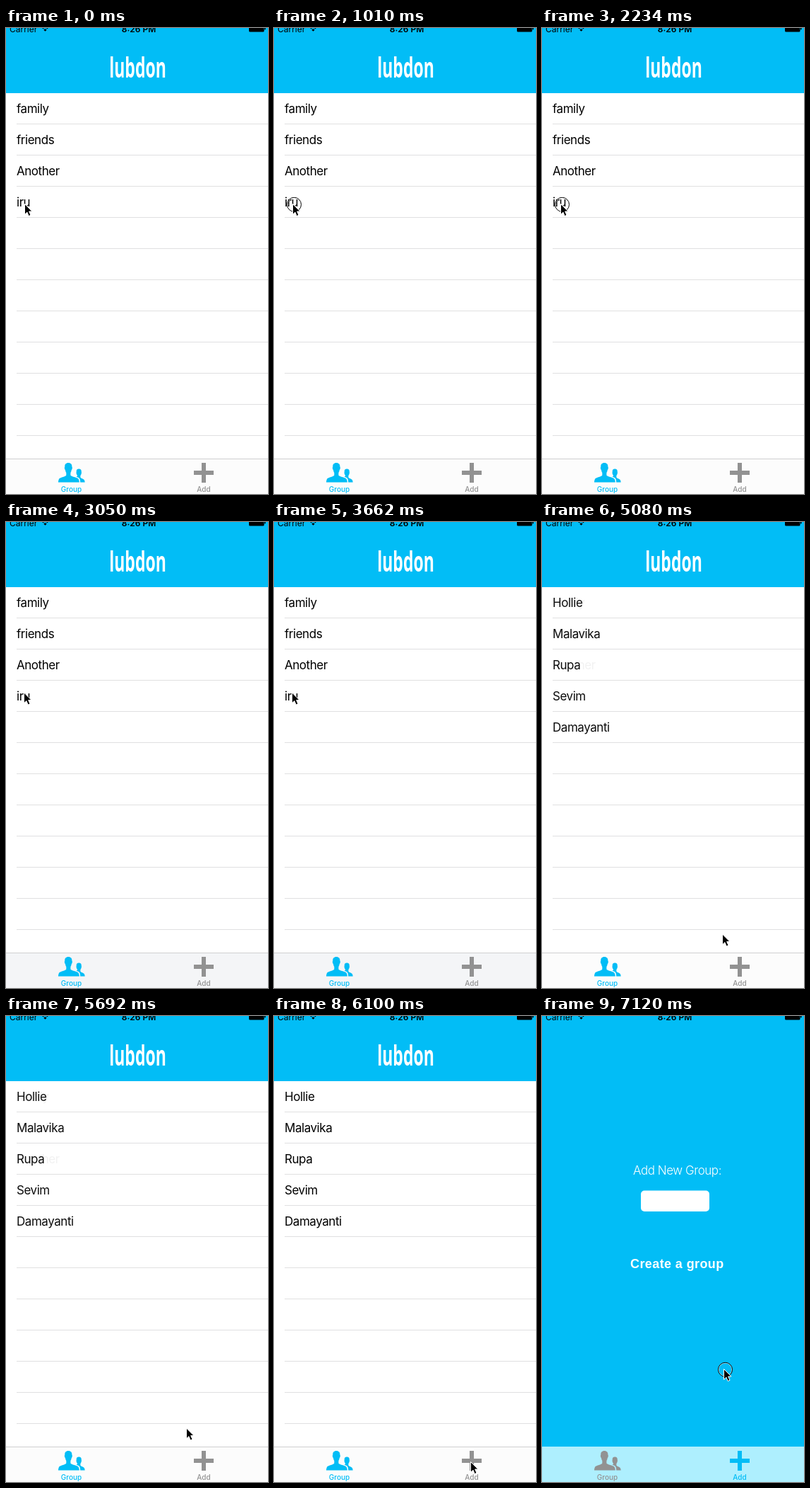
Recreate the animation shown at these times as an HTML page. Size 371 by 658 pixels, loop 8 s.

```html
<!DOCTYPE html>
<html lang="en">
<head>
<meta charset="utf-8">
<title>Group list</title>
<style>
  html, body { margin: 0; width: 100%; height: 100%; overflow: hidden; background: #fff; }
  svg { display: block; width: 100vw; height: 100vh; }
  text { font-family: Inter, Roboto, sans-serif; white-space: pre; }
  .row, .label { font-size: 17px; letter-spacing: -.45px; }
  .label { font-weight: 300; fill: #fff; }
  .status { font-size: 12px; }
  .tab { font-size: 10px; font-weight: 500; }
  .title { font: 700 23px "Open Sans", "Noto Sans", sans-serif; fill: #fff; }
  .button { font: bold 18px "Liberation Sans", Arial, sans-serif; letter-spacing: .4px; fill: #fff; }
</style>
</head>
<body>
<svg viewBox="0 0 371 658" xmlns="http://www.w3.org/2000/svg">
  <rect width="371" height="658" fill="#fff"/>
  <g id="list">
    <rect width="371" height="92" fill="#02bdf6"/>
    <text class="title" transform="translate(186.5 69.5) scale(1 1.68)" text-anchor="middle">lubdon</text>
    <g id="lines" fill="#e0e0e1"></g>
    <g id="groups"></g>
    <g id="members"></g>
  </g>
  <g id="form">
    <rect width="371" height="658" fill="#02bdf6"/>
    <text class="label" x="129" y="223.5">Add New Group:</text>
    <rect x="140" y="246.5" width="97" height="29.5" rx="5" fill="#fff"/>
    <text class="button" x="125" y="356">Create a group</text>
  </g>

  <g class="status">
    <text x="5" y="5.5">Carrier</text>
    <path d="M51.8 .6Q55.5 -2 59.2 .6" fill="none" stroke="#000" stroke-width="1.4"/>
    <path d="M53.3 2.4Q55.5 .6 57.7 2.4L55.5 4.8Z"/>
    <text x="188" y="5.5" text-anchor="middle" font-weight="600">8:26 PM</text>
    <rect x="344" y="-4" width="21.5" height="9.5" rx="1.5"/>
    <rect x="366" y="-1" width="1.5" height="3.5" rx=".7"/>
  </g>

  <rect id="bar" y="608" width="371" height="50"/>
  <rect id="edge" y="608" width="371" height="1" fill="#cfcfd1"/>
  <g id="groupTab">
    <path d="M88.3 614C91.8 614 93.6 616.3 93.4 619.5C94.4 620.4 93.6 623.4 92.7 624.2C92.4 626 92 627 91.4 628V631.4C92.2 633.4 100.6 634.2 102.4 636.6C103.4 638 103.8 640 103.8 641.5H74C74 640 74.4 638 75.2 636.6C77 634.2 84.6 633.4 85.3 631.4V628C84.7 627 84.3 626 84 624.2C83.1 623.4 82.3 620.4 83.3 619.5C83 616.3 84.8 614 88.3 614Z"/>
    <path d="M103.2 622.6C105.7 622.6 106.9 624.2 106.8 626.6C107.3 628.4 106.6 630.4 105.4 632V634.4C106 636 110 636.2 111 638.4C111.5 639.5 111.7 640.6 111.7 641.5H105.2C105.2 639.4 104.9 637.2 103.8 635.8C102.8 634.6 101 634 99.3 633.5C100.6 633.2 101.1 632.8 101.1 632C99.8 630.4 99.2 628.4 99.7 626.6C99.5 624.2 100.7 622.6 103.2 622.6Z"/>
    <text class="tab" x="92.5" y="654.5" text-anchor="middle">Group</text>
  </g>
  <g id="addTab">
    <path d="M277 614h6v11h11v6h-11v11h-6v-11h-11v-6h11Z"/>
    <text class="tab" x="280" y="654.5" text-anchor="middle">Add</text>
  </g>

  <g id="pointer">
    <g id="ring" fill="none">
      <circle cx="2.5" cy=".8" r="9.4" stroke="#fff" stroke-width=".8"/>
      <circle cx="2.5" cy=".8" r="10" stroke="#000" stroke-width="1"/>
    </g>
    <path d="M.5 0V14.8L3.9 11.6L6.2 17L9 15.8L6.7 10.5H11Z" stroke="#fff" stroke-width="1" stroke-linejoin="round"/>
  </g>
</svg>
<script>
const LOOP = 8000, BLUE = '#02bdf6', GREY = '#929292';
const $ = id => document.getElementById(id);

function add(parent, tag, attrs, text = '') {
  const el = document.createElementNS('http://www.w3.org/2000/svg', tag);
  for (const key in attrs) el.setAttribute(key, attrs[key]);
  el.textContent = text;
  parent.append(el);
}

function fillRows(id, names) {
  names.forEach((name, i) =>
    add($(id), 'text', { class: 'row', x: 15, y: 119.7 + 44 * i }, name));
}

for (let i = 0; i < 11; i++) {
  add($('lines'), 'rect', { x: 15, y: 135 + 44 * i, width: 356, height: 1 });
}
fillRows('groups', ['family', 'friends', 'Another', 'iru']);
fillRows('members', ['Hollie', 'Malavika', 'Rupa', 'Sevim', 'Damayanti']);

// mix: 0 shows the groups, 1 the members
const steps = [
  { at: 0, x: 26, y: 248.5, mix: 0 },
  { at: 1010, x: 26, y: 248.5, mix: 0, press: true },
  { at: 3050, x: 25, y: 241, mix: 0, bar: '#f4f5f7' },
  { at: 4070, x: 25, y: 241, mix: .7, press: true },
  { at: 5080, x: 255, y: 582, mix: .95 },
  { at: 6100, x: 278, y: 629.5, mix: 1 },
  { at: 7120, x: 257, y: 498.5, mix: 1, press: true, form: true, bar: '#aeeffe' }
];

const set = (id, key, value) => $(id).setAttribute(key, value);
const show = (id, on) => set(id, 'visibility', on ? 'visible' : 'hidden');

function draw(time) {
  const t = time % LOOP;
  const s = steps.findLast(step => step.at <= t) || steps[0];
  show('list', !s.form);
  show('form', s.form);
  show('edge', !s.form);
  show('ring', s.press);
  set('groups', 'opacity', 1 - s.mix);
  set('members', 'opacity', s.mix);
  set('bar', 'fill', s.bar || '#fcfcfc');
  set('groupTab', 'fill', s.form ? GREY : BLUE);
  set('addTab', 'fill', s.form ? BLUE : GREY);
  set('pointer', 'transform', `translate(${s.x} ${s.y})`);
}

const start = performance.now();
function tick() {
  draw(performance.now() - start);
  requestAnimationFrame(tick);
}
tick();
</script>
</body>
</html>
```
